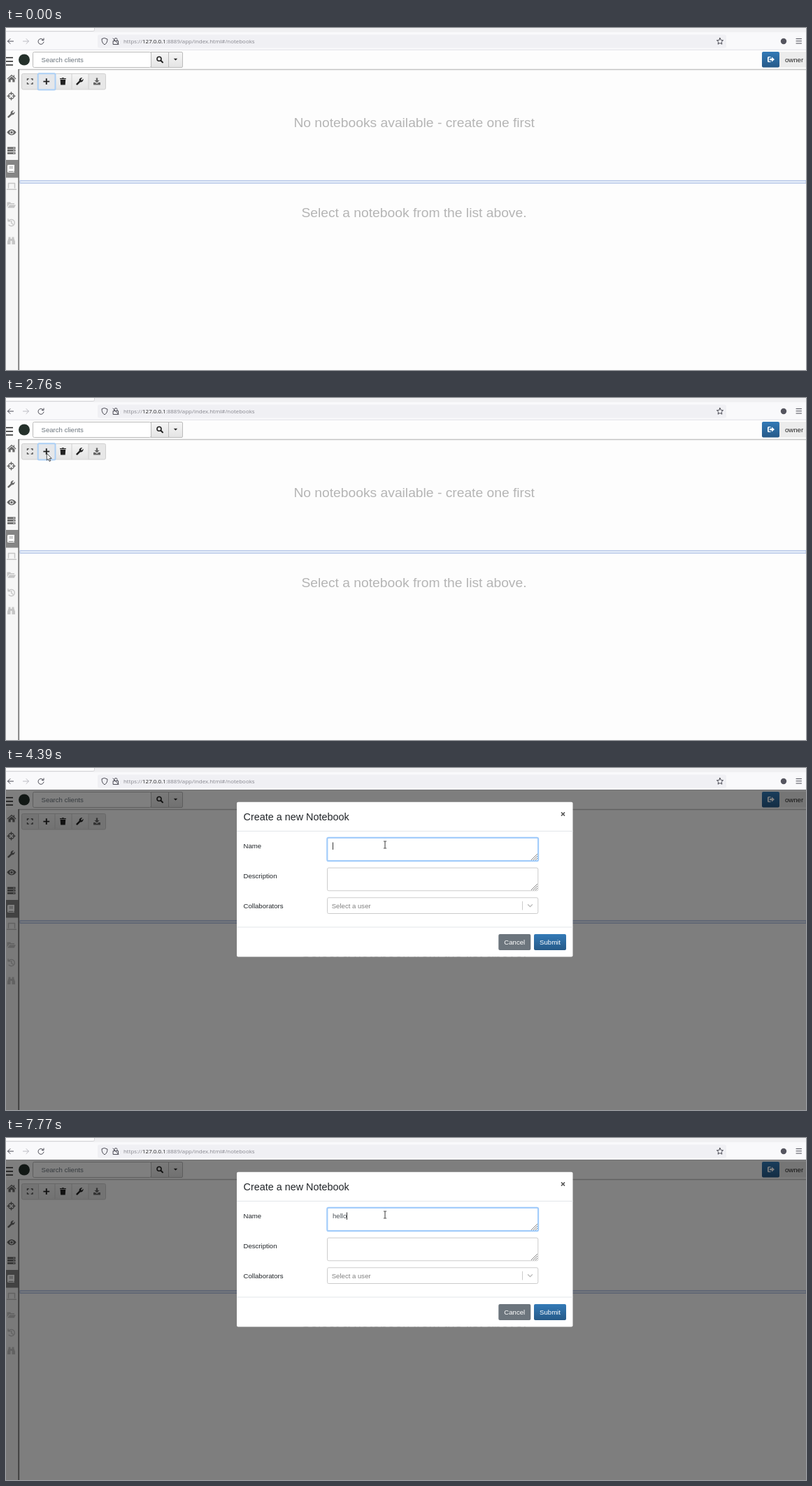
An HTML page that plays this animation: 1144x490 px, repeating every 8 s.

```html
<!DOCTYPE html>
<html lang="en">
<head>
<meta charset="utf-8">
<title>Create a notebook</title>
<style>
html, body { margin: 0; height: 100%; overflow: hidden; background: #fdfdfd; }
svg { display: block; width: 100vw; height: 100vh; font: 9.6px "Liberation Sans", Arial, sans-serif; }
.line { fill: none; stroke: currentColor; stroke-linecap: round; stroke-linejoin: round; }
.icon { fill: currentColor; }
.box { fill: #fff; stroke: #ccc; }
.mid { text-anchor: middle; }
</style>
</head>
<body>
<svg viewBox="0 0 1144 490" xmlns="http://www.w3.org/2000/svg">
  <defs>
    <linearGradient id="blue" x2="0" y2="1"><stop stop-color="#337ab7"/><stop offset="1" stop-color="#265a88"/></linearGradient>
    <linearGradient id="grey" x2="0" y2="1"><stop stop-color="#f5f5f5"/><stop offset="1" stop-color="#e4e4e4"/></linearGradient>
    <path id="wrench" d="M-5 3.2L-.9-.8A3.7 3.7 0 0 1 3.7-5L1.6-3 2-2 3-1.6 5-3.7A3.7 3.7 0 0 1 .8.9L-3.2 5A1.3 1.3 0 0 1-5 3.2z"/>
    <path id="grip" d="M-9 0L0-9M-6 0L0-6M-3 0L0-3" stroke="#777" stroke-width=".9"/>
  </defs>

  <!-- Browser bar -->
  <rect width="1144" height="31" fill="#f9f9fb"/>
  <rect width="1144" height="6" fill="#f0f0f2"/>
  <rect x="-5" y="-5" width="131.5" height="9.5" rx="2" fill="#fff" stroke="#ccccd0" stroke-width=".8"/>
  <rect x="131" y="9.5" width="899" height="19" rx="2.5" fill="#f0f0f4"/>
  <g class="line" color="#4b4b55">
    <path d="M10.5 19H2.5M6 15.5L2.5 19 6 22.5"/>
    <path d="M24.500 19h8M29 15.500L32.500 19 29 22.500" color="#bbbbc2"/>
    <path d="M53.300 17A4 4 0 1 0 54 20M54 14.800V17.500H51.300"/>
    <path d="M141 14.500L145 16C145 20 143.500 22.500 141 23.800 138.500 22.500 137 20 137 16z"/>
    <path d="M155 18V16.500A2 2 0 0 1 159 16.500V18M153.500 18.500H160.500V23.500H153.500zM153 15L161 23.500"/>
    <path d="M1021 14.300L1022.400 17.400 1025.600 17.700 1023.200 19.900 1023.900 23.200 1021 21.500 1018.100 23.200 1018.800 19.900 1016.400 17.700 1019.600 17.400z"/>
    <path d="M1130 15.500h7.500M1130 18.700h7.500M1130 22h7.500"/>
  </g>
  <circle cx="1112" cy="19" r="4.200" fill="#55555f"/>
  <text x="168" y="22" fill="#85858d" style="font:7.950px 'Open Sans', sans-serif">https://<tspan fill="#222">127.0.0.1</tspan>:8889/app/index.html#/notebooks</text>

  <!-- Navigation -->
  <path d="M0 31.300H1144" stroke="#e2e2e6"/>
  <path d="M18 59.500H1144" stroke="#c4c4c4" stroke-width="1.400"/>
  <path d="M0 42.500H10M0 47.800H10M0 53H10" stroke="#222" stroke-width="1.600"/>
  <circle cx="26" cy="45.500" r="8" fill="#25312b"/>
  <g stroke="#bbb">
    <rect x="38.500" y="34.500" width="169" height="22" rx="2" fill="#fff"/>
    <rect x="207.500" y="34.500" width="25" height="22" fill="url(#grey)"/>
    <rect x="232.500" y="34.500" width="20" height="22" rx="1.500" fill="url(#grey)"/>
  </g>
  <text x="50.500" y="48.700" fill="#6c757d">Search clients</text>
  <path class="line" d="M221.500 46.800L224 49.300" color="#222" stroke-width="2"/>
  <circle class="line" cx="219" cy="44.300" r="3" color="#222" stroke-width="1.600"/>
  <path d="M239.800 43.700h5.400L242.500 46.500z" fill="#222"/>
  <rect x="1106" y="34" width="45" height="22.500" fill="#ececec"/>
  <rect x="1081" y="34" width="25" height="22.500" rx="2" fill="url(#blue)"/>
  <path d="M1093.500 41h-3a1.500 1.500 0 0 0-1.500 1.500v5a1.500 1.500 0 0 0 1.500 1.500h3v-1.300h-2.700v-5.400h2.700zM1092 43.800h3v-2.300l4 3.500-4 3.500v-2.300h-3z" fill="#fff"/>
  <text x="1114" y="48.700" fill="#222">owner</text>

  <!-- Sidebar -->
  <path d="M0 60H17V490H0z" fill="#f6f6f6"/>
  <path d="M0 189H18V214.500H0z" fill="#858585"/>
  <path d="M18.200 59V490" stroke="#777" stroke-width="1.800"/>
  <g class="icon" color="#686868">
    <path d="M1.500 72.500L8 66.800 10.800 69.200V67.500H12V70.300L14.500 72.500 13.700 73.400 8 68.500 2.300 73.400zM3.500 73.500L8 69.600 12.500 73.500V77.500H9.300V74.200H6.700V77.500H3.500z"/>
    <path class="line" d="M11.500 97.500a4 4 0 1 1-8 0a4 4 0 1 1 8 0M7.500 92v3.500M7.500 99.500V103M2 97.500H5.500M9.500 97.500H13" stroke-width="1.400"/>
    <use href="#wrench" x="7.500" y="123.500"/>
    <path fill-rule="evenodd" d="M1.500 149.500Q8-.5 14.500 149.500z" transform="matrix(1 0 0 .055 0 141.300)"/>
    <path d="M1.500 149.500Q4 145.400 8 145.400T14.500 149.500Q12 153.600 8 153.600T1.500 149.500"/>
    <circle cx="8" cy="149.500" r="2.700" fill="#f6f6f6"/><circle cx="8" cy="149.500" r="1.700"/>
    <path d="M2 170.500H13.500V173.400H2zM2 174.200H13.500V177.100H2zM2 177.900H13.500V180.800H2z"/>
    <path d="M10.500 172h1.500M10.500 175.700h1.500M10.500 179.400h1.500" stroke="#f6f6f6"/>
    <path fill="#fff" fill-rule="evenodd" d="M3.500 196H12V205H11.200V206H12V207H3.500A1.500 1.500 0 0 1 2 205.500V197.500A1.500 1.500 0 0 1 3.500 196zM4.500 198.500V199.300H10V198.500zM4.500 200.500V201.300H10V200.500zM3.600 205V206H10.400V205z"/>
  </g>
  <g class="icon" color="#c6c6c6">
    <path class="line" d="M3.500 229V222.500H12.500V229M1.500 231.300H14.500" stroke-width="1.500"/>
    <path d="M1.500 249.500H6L7.200 251H12V252.600H4.500L1.500 256.800zM5 253.400H14L11.800 257.800H2.300z"/>
    <path class="line" d="M4 276A4.700 4.700 0 1 1 4.200 282.300M3 273.700V276.700H6M7.800 276.500V279.500L9.700 281" stroke-width="1.400"/>
    <path d="M3.500 299.500H6.500V302H8.500V299.500H11.500V301.500L13 306V310H8.500V305H6.500V310H2V306L3.500 301.500z"/>
  </g>

  <!-- Toolbar -->
  <rect x="22.500" y="65.500" width="120" height="22.500" rx="2" fill="#e7e7e7" stroke="#d0d0d0"/>
  <path d="M46 66H118V87.500H46z" fill="url(#grey)"/>
  <path d="M46.500 66V87.500M70 66V87.500M94 66V87.500M118 66V87.500" stroke="#d0d0d0"/>
  <rect id="buttonFocus" x="45.700" y="65.200" width="24.800" height="23.200" rx="1.500" fill="#e5e7ea" stroke="#abcff5" stroke-width="2"/>
  <g class="icon" color="#222">
    <path d="M30.500 75V72.800H32.800M35.700 72.800H38V75M38 78V80.200H35.700M32.800 80.200H30.500V78" fill="none" stroke="#4a4a4a" stroke-width="1.300"/>
    <path d="M57.800 72.200V81M53.400 76.600H62.200" stroke="#222" stroke-width="1.900"/>
    <path d="M77 72H79.800L80.400 71.300H82.400L83 72H85.800V73.300H77zM77.600 74H85.200L84.700 81.500H78.100z"/>
    <use href="#wrench" x="105.500" y="76.500"/>
    <path d="M128.800 71.500H131.200V75H133.500L130 78.500 126.500 75H128.800zM125 78H127.700L130 80 132.300 78H135V81.500H125z" color="#666"/>
  </g>

  <!-- Panes -->
  <path d="M20 218.500H1144V222.500H20z" fill="#dfe8f7" stroke="#b3c4e6"/>
  <g class="mid" font-size="19.250" fill="#b5b5b5">
    <text x="583.700" y="142.200">No notebooks available - create one first</text>
    <text x="583.500" y="271.200">Select a notebook from the list above.</text>
  </g>

  <!-- Dialog -->
  <g id="dialog" fill="#212529">
    <path d="M0 31H1144V490H0z" fill="#000" opacity=".5"/>
    <rect x="330" y="48.800" width="480.500" height="221.700" rx="2" fill="#fff"/>
    <path d="M330 90.500H810.500M330 228H810.500" stroke="#e3e6e9"/>
    <text x="339.500" y="74.800" font-size="14.400">Create a new Notebook</text>
    <path d="M794 63.500L799 68.500M799 63.500L794 68.500" stroke="#555" stroke-width="1.700"/>
    <text x="339.500" y="115.200">Name</text>
    <text x="339.500" y="158">Description</text>
    <text x="339.500" y="200.800">Collaborators</text>
    <rect class="box" x="459.500" y="100.300" width="301.300" height="32.700" rx="2"/>
    <rect class="box" x="459.500" y="143.100" width="301.300" height="32.700" rx="2"/>
    <rect class="box" x="459.500" y="185.800" width="301.300" height="22.700" rx="2"/>
    <rect id="inputFocus" x="459.300" y="99.800" width="301.800" height="33.400" rx="2" fill="none" stroke="#a3cdfb" stroke-width="2.200"/>
    <use href="#grip" x="760" y="132"/>
    <use href="#grip" x="760" y="175"/>
    <text x="465.700" y="200.800" fill="#808080">Select a user</text>
    <path d="M738.500 191V203.500" stroke="#ccc"/>
    <path class="line" d="M746.500 195.800L749.500 198.800 752.500 195.800" color="#bbb" stroke-width="1.300"/>
    <rect x="704.300" y="238" width="46" height="23" rx="2" fill="#6c757d"/>
    <rect x="755" y="238" width="46" height="23" rx="2" fill="url(#blue)"/>
    <g class="mid" fill="#fff"><text x="727.300" y="253">Cancel</text><text x="778" y="253">Submit</text></g>
    <text id="typed" x="467" y="115.200" fill="#495057"></text>
    <path id="caret" d="M.5 106.500V117" stroke="#222" stroke-width=".9"/>
  </g>

  <path id="arrow" d="M.3.300V10.200L2.500 8.200 4 11.700 5.700 11 4.200 7.600H7.200z" fill="#fff" stroke="#222" stroke-width=".8"/>
  <path id="beam" d="M-2-5H-.6L0-4.500.6-5H2M0-4.500V4.500M-2 5H-.6L0 4.500.6 5H2" fill="none" stroke="#222" stroke-width=".9"/>
</svg>
<script>
const el = id => document.getElementById(id);
const show = (id, on) => el(id).style.display = on ? '' : 'none';

// Pointer legs: start, step length, steps, from, to, ease-out power
const legs = [
  [260, 70, 11, [1092, 479], [326, 208], 1],
  [1030, 70, 2, [326, 208], [209, 147], 1],
  [1170, 70, 10, [209, 147], [75, 84], 4],
  [1870, 70, 7, [75, 84], [58, 79], 1],
  [3372, 68, 6, [58, 79], [398, 112], 1],
  [3780, 67.500, 4, [398, 112], [542, 110], 1.500]
];
const keys = [[5510, 'h'], [5780, 'e'], [6710, 'l'], [6840, 'l'], [7770, 'o']];
const caretToggles = [4390, 4920, 5380, 5980, 6440, 7040, 7700];

function pointer(t) {
  const [start, step, count, from, to, power] = legs.filter(leg => leg[0] <= t).pop();
  const u = Math.min(1, Math.floor((t - start) / step + 1e-6) / count);
  const k = 1 - (1 - u) ** power;
  return from.map((v, i) => v + (to[i] - v) * k);
}

function draw(now) {
  const t = now % 8000;
  const open = t >= 2830;
  show('dialog', open);
  show('buttonFocus', !open);
  el('inputFocus').style.opacity = Math.max(0, Math.min(1, (t - 4180) / 210));

  const text = keys.filter(key => key[0] <= t).map(key => key[1]).join('');
  el('typed').textContent = text;
  show('caret', caretToggles.filter(time => time <= t).length % 2);
  const width = text ? el('typed').getComputedTextLength() : 0;
  el('caret').setAttribute('transform', `translate(${Math.round(467 + width)} 0)`);

  const visible = t >= 260;
  const [x, y] = visible ? pointer(t) : [0, 0];
  const overInput = open && x > 459;
  show('arrow', visible && !overInput);
  show('beam', visible && overInput);
  el(overInput ? 'beam' : 'arrow').setAttribute('transform', `translate(${x} ${y})`);
}

function tick() {
  draw(performance.now());
  requestAnimationFrame(tick);
}
tick();
</script>
</body>
</html>
```
